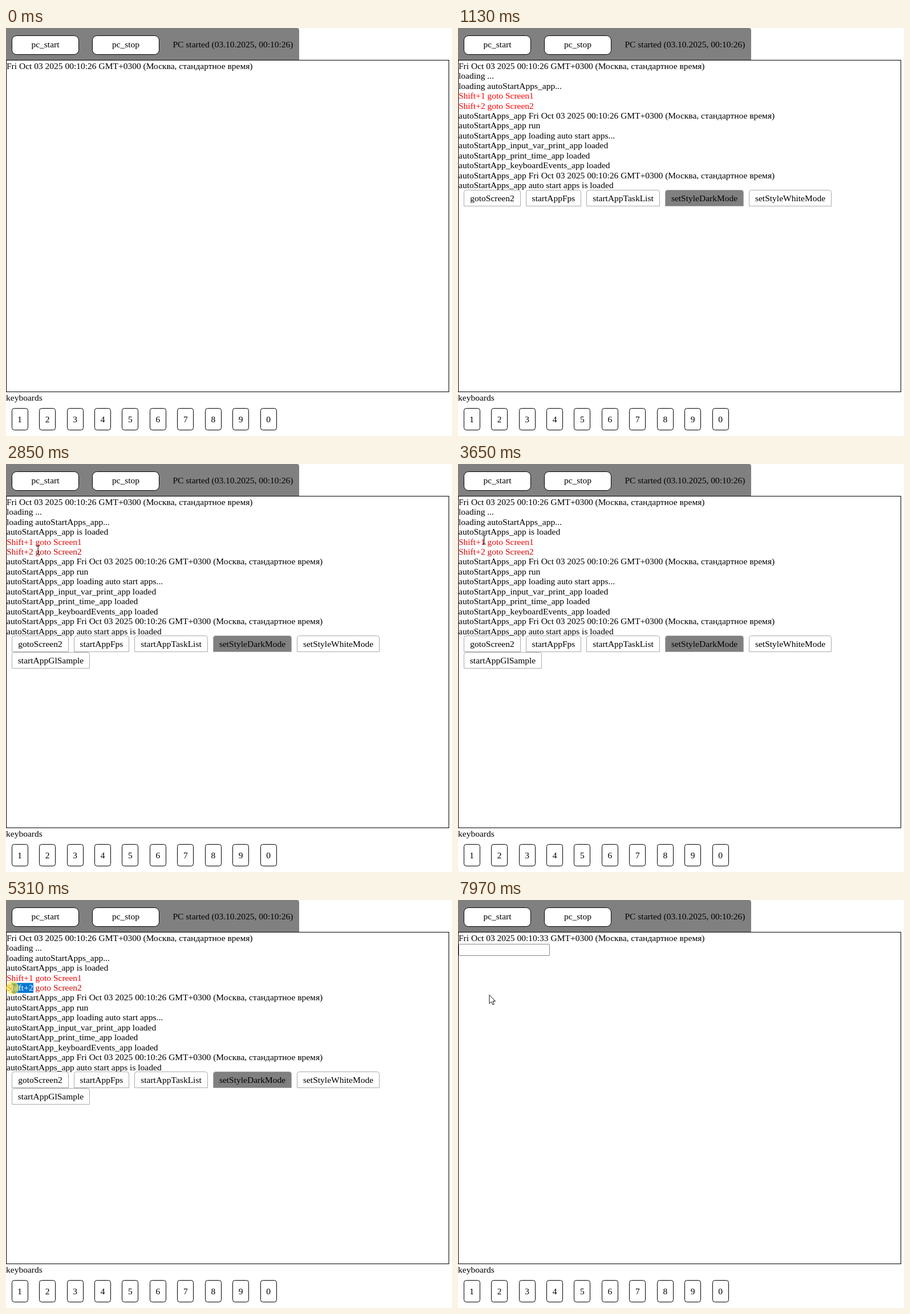
Write an HTML page that moves like this. It is 782 by 716 pixels and loops after 8000 ms.

```html
<!DOCTYPE html>
<html lang="en">
<head>
<meta charset="utf-8">
<title>Console</title>
<style>
  html, body { margin: 0; width: 100%; height: 100%; overflow: hidden; background: #fff; }
  svg { display: block; }
  text { font: 15.5px "Liberation Serif", "Times New Roman", serif; white-space: pre; }
</style>
</head>
<body>
<svg id="stage" width="782" height="716" viewBox="0 0 782 716"></svg>
<script>
const LOOP = 8000, TICK = 66.4, LINE = 17.44, FIRST = 71.8;
const stage = document.getElementById('stage');

function add(parent, tag, attrs = {}, content) {
  const el = document.createElementNS('http://www.w3.org/2000/svg', tag);
  for (const key in attrs) el.setAttribute(key, attrs[key]);
  if (content !== undefined) el.textContent = content;
  parent.append(el);
  return el;
}
const label = (parent, x, y, content, extra) => add(parent, 'text', { x, y, ...extra }, content);
const box = (parent, x, y, width, height, rx, extra) =>
  add(parent, 'rect', { x, y, width, height, rx, fill: '#fff', stroke: '#000', ...extra });
const show = (el, on) => el.setAttribute('visibility', on ? 'visible' : 'hidden');
const move = (el, x, y) => el.setAttribute('transform', `translate(${x} ${y})`);
const baseline = row => Math.round(FIRST + row * LINE);

// Static frame: toolbar, screen, keyboard
add(stage, 'path', { d: 'M0 56V0H510Q514 0 514 4V56Z', fill: '#808080' });
[[10.5, 'pc_start'], [151.5, 'pc_stop']].forEach(([x, name]) => {
  box(stage, x, 13.5, 117, 33, 8);
  label(stage, x + 58.5, 34, name, { 'text-anchor': 'middle' });
});
label(stage, 292.5, 34, 'PC started (03.10.2025, 00:10:26)');
box(stage, 0.5, 56.5, 776, 582, 0);
label(stage, 0, 654, 'keyboards');
[...'1234567890'].forEach((digit, i) => {
  const left = 9.69 + i * 48.44;
  box(stage, Math.round(left) + 0.5, 667.5, 28, 38, 4);
  label(stage, left + 14.5, 692, digit, { 'text-anchor': 'middle' });
});

// Console log: [appears at, text]
const stamp = sec => `Fri Oct 03 2025 00:10:${sec} GMT+0300 (Москва, стандартное время)`;
const app = 'autoStartApps_app';
const INSERT = 1190, CLEAR = 7440;
const log = [
  [0, stamp(26)],
  [70, 'loading ...'],
  [270, `loading ${app}...`],
  [INSERT, `${app} is loaded`],
  [400, 'Shift+1 goto Screen1', '#f00'],
  [400, 'Shift+2 goto Screen2', '#f00'],
  [400, `${app} ${stamp(26)}`],
  [400, `${app} run`],
  [600, `${app} loading auto start apps...`],
  [670, 'autoStartApp_input_var_print_app loaded'],
  [670, 'autoStartApp_print_time_app loaded'],
  [730, 'autoStartApp_keyboardEvents_app loaded'],
  [730, `${app} ${stamp(26)}`],
  [730, `${app} auto start apps is loaded`]
];
const consoleView = add(stage, 'g');
const lines = log.map(([start, content, fill = '#000']) =>
  ({ start, el: label(consoleView, 1, 0, content, { fill }) }));

// App buttons: [appears at, x, row, width, name]
const buttons = [
  [990, 10.5, 0, 99, 'gotoScreen2'],
  [990, 119.5, 0, 96, 'startAppFps'],
  [990, 225.5, 0, 128, 'startAppTaskList'],
  [1060, 363.5, 0, 137, 'setStyleDarkMode', '#808080'],
  [1130, 510.5, 0, 144, 'setStyleWhiteMode'],
  [INSERT, 10.5, 1, 136, 'startAppGlSample']
].map(([start, x, row, w, name, fill = '#fff']) => {
  const el = add(consoleView, 'g');
  add(el, 'path', {
    d: `M${x} 28V4q0-4 4-4h${w - 8}q4 0 4 4v24Z`, fill, stroke: '#aaa'
  });
  label(el, x + w / 2, 19.5, name, { 'text-anchor': 'middle' });
  return { start, row, el };
});

// Screen two
const inputView = add(stage, 'g');
label(inputView, 1, baseline(0), stamp(33));
box(inputView, 1.5, 77.5, 159, 20, 1.5, { stroke: '#85858c' });

// Text selection: blue bar with a clipped white copy of the words
const clip = add(add(stage, 'defs'), 'clipPath', { id: 'picked' });
const clipBar = add(clip, 'rect', { height: LINE });
const selection = add(stage, 'g');
const bar = add(selection, 'rect', { height: LINE, fill: '#0078d7' });
const pickedText = label(selection, 1, 0, '', { fill: '#fff', 'clip-path': 'url(#picked)' });

// Left edges of the letters in "Shift"
const EDGES = [1, 9.6, 17.4, 21.7, 26.8], SELECT_END = 48;

// Pointer
const beam = add(stage, 'path', {
  d: 'M-3 -7.5H-1L0 -6.7 1 -7.5H3M0 -6.7V6.7M-3 7.5H-1L0 6.7 1 7.5H3',
  fill: 'none', stroke: '#111', 'stroke-width': 1.1
});
const arrow = add(stage, 'path', {
  d: 'M.5 .5V15.8L4 12.5 6.4 17.8 8.8 16.8 6.5 11.6H11Z',
  fill: '#fff', stroke: '#111', 'stroke-width': 1
});
const spot = add(stage, 'circle', { r: 11.5, fill: '#ffe838', 'fill-opacity': 0.62 });

// [time, x, y]
const track = [
  [1660, 537, 600], [2125, 317, 401], [2457, 96.5, 215], [2660, 66, 170],
  [2920, 49, 142], [3190, 42.5, 130.8], [3850, 43, 131], [3910, 44.5, 131.5],
  [4180, 17.5, 135], [4320, 17.5, 135], [4580, 46, 149], [4780, 49.5, 153.5],
  [5180, 16.5, 153.5], [5310, 11.5, 154], [5450, 11.5, 155], [5650, 11.5, 155],
  [6040, 49.5, 165.5], [7910, 49.5, 165.5], [7968, 54.5, 166]
];
const presses = [[3380, 3520], [3910, 4380], [4780, 5710], [6370, 6510]];

function pointerAt(t) {
  const end = track.findIndex(key => key[0] > t);
  if (end < 0) return track[track.length - 1].slice(1);
  const [t0, x0, y0] = track[end - 1], [t1, x1, y1] = track[end];
  const k = (t - t0) / (t1 - t0);
  return [x0 + (x1 - x0) * k, y0 + (y1 - y0) * k];
}

function drawLog(t) {
  const inserted = t >= INSERT;
  let row = 0;
  lines.forEach(({ start, el }) => {
    show(el, t >= start);
    if (t >= start) el.setAttribute('y', baseline(row++));
  });
  lines[4].el.setAttribute('fill', inserted ? '#ea0808' : '#f00');
  lines[5].el.setAttribute('fill', inserted ? '#d00808' : '#f00');
  const top = inserted ? 301.5 : 284.5;
  buttons.forEach(({ start, row, el }) => {
    show(el, t >= start);
    move(el, 0, top + row * 29);
  });
}

function drawSelection(t, x) {
  const second = t >= 4780;
  const on = (t >= 3910 && t < 4780) || (second && t < 6370);
  let left = EDGES.find(edge => edge + 4 > x) ?? Math.min(x, SELECT_END);
  if (!second && t >= 4180) left = EDGES[2];
  if (t >= 5380) left = EDGES[0];
  const row = second ? 5 : 4;
  show(selection, on);
  for (const el of [bar, clipBar]) {
    el.setAttribute('x', left);
    el.setAttribute('y', baseline(row) - 13.5);
    el.setAttribute('width', Math.max(0, SELECT_END - left));
  }
  pickedText.textContent = second ? 'Shift+2' : 'Shift+1';
  pickedText.setAttribute('y', baseline(row));
}

function draw(t) {
  const cleared = t >= CLEAR;
  consoleView.style.display = cleared ? 'none' : '';
  inputView.style.display = cleared ? '' : 'none';
  drawLog(t);

  const tick = Math.floor((t + 6) / TICK) * TICK;
  const visible = t >= 1660;
  const [x, y] = visible ? pointerAt(Math.max(1660, tick)) : [0, 0];
  const overText = visible && !cleared && y < 300;
  drawSelection(t, x);
  show(spot, presses.some(([from, to]) => t >= from && t < to));
  show(beam, overText);
  show(arrow, visible && !overText);
  move(spot, x, y);
  move(beam, x + 3, y + 2);
  move(arrow, x, y);
}

const begin = performance.now();
function frame() {
  draw((performance.now() - begin) % LOOP);
  requestAnimationFrame(frame);
}
frame();
</script>
</body>
</html>
```
